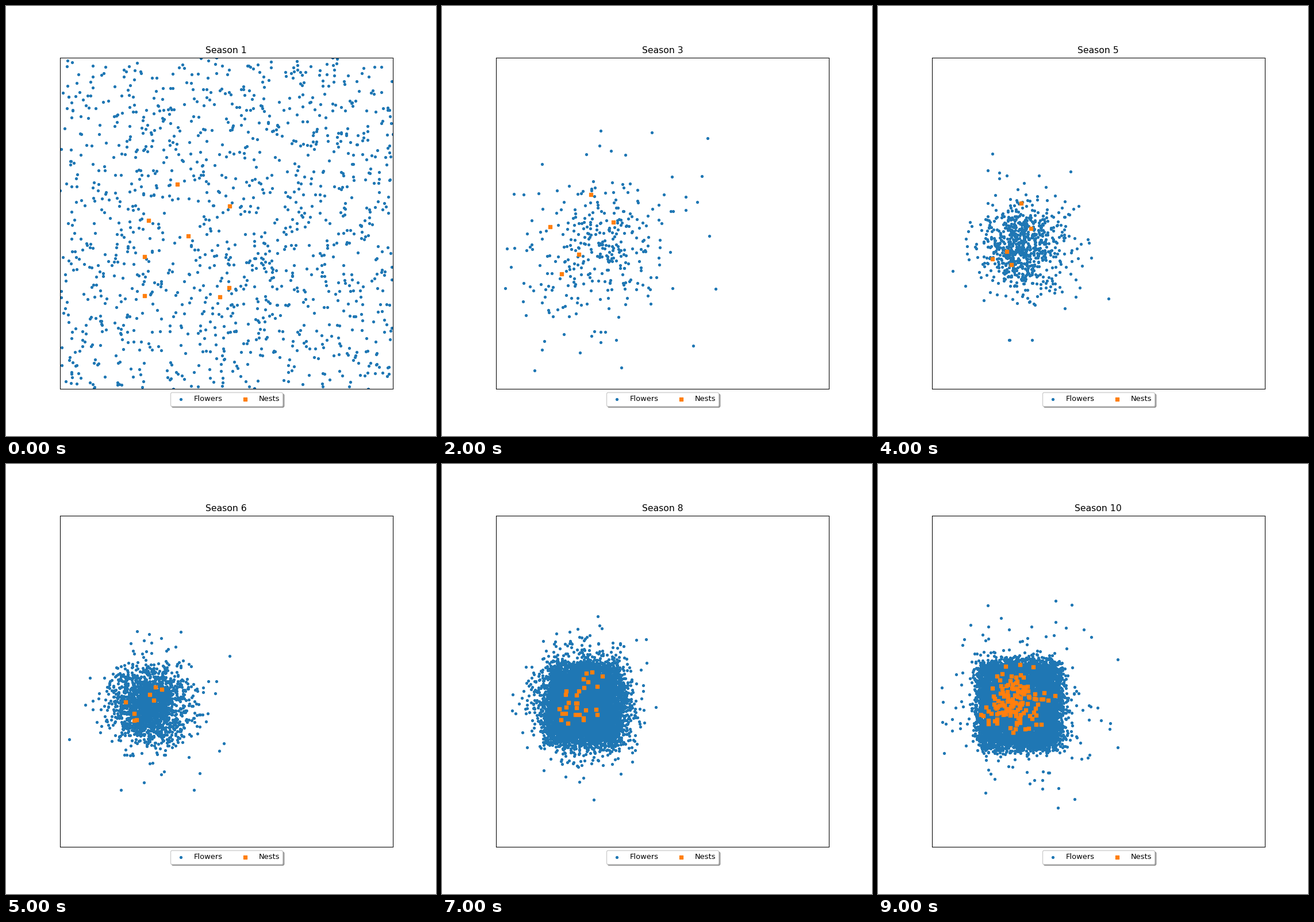
Animation of 748x748 px, one loop 10 s. Source, as a matplotlib script:

```python
import numpy as np
import matplotlib.pyplot as plt
from matplotlib.animation import FuncAnimation

SIZE, DPI, SEASONS = 748, 93.5, 10
LEFT, RIGHT, TOP, BOTTOM = 0.125 * SIZE, 0.9 * SIZE, 0.12 * SIZE, 0.89 * SIZE
HOME = np.array([246, 419])

# How the flower field develops at a few key seasons
KEYS = [2, 3, 5, 7, 9, 10]
COUNT = [630, 340, 760, 4500, 15000, 8000]
SPREAD = [60, 45, 34, 28, 41, 38]
STRAYS = [0.45, 0.5, 0.15, 0.02, 0.015, 0.03]
BOXINESS = [0, 0, 0, 0, 1, 1]

FOUNDERS = [(298, 310), (389, 348), (248, 373), (317, 400),
            (241, 436), (241, 504), (388, 490), (372, 506)]
NEST_COUNT = [8, 6, 5, 4, 5, 8, 12, 28, 61, 137]


def flowers(season):
    rng = np.random.default_rng(40 + season)
    if season == 1:
        return rng.uniform((LEFT, TOP), (RIGHT, BOTTOM), (1250, 2))
    n = int(np.exp(np.interp(season, KEYS, np.log(COUNT))))
    spread, strays, boxiness = (np.interp(season, KEYS, row)
                                for row in (SPREAD, STRAYS, BOXINESS))
    # The cloud turns from round to square as it fills up
    round_part = rng.normal(0, 1, (n, 2))
    box_part = rng.uniform(-1.75, 1.75, (n, 2)) + rng.normal(0, 0.25, (n, 2))
    pts = np.where(rng.random((n, 1)) < boxiness, box_part, round_part)
    far = rng.random(n) < strays
    pts[far] = 1.8 * np.clip(round_part[far], -2.5, 2.5)
    drift = (54 * 0.5 ** (season - 2), 0)
    pts = HOME + drift + spread * pts * (1, 1.06)
    return pts[((pts > (LEFT + 13, TOP + 5)) & (pts < (555, BOTTOM - 5))).all(axis=1)]


def nest_line():
    """Each new nest lies near an older one, a little closer to home."""
    rng = np.random.default_rng(7)
    line = [np.array(FOUNDERS)]
    for count in NEST_COUNT[1:]:
        old = line[-1]
        parents = old[rng.permutation(np.arange(count) % len(old))]
        line.append(parents + 0.25 * (HOME - parents) + rng.normal(0, 18, (count, 2)))
    return line


field = [flowers(s) for s in range(1, SEASONS + 1)]
nests = nest_line()

fig, ax = plt.subplots(figsize=(SIZE / DPI, SIZE / DPI), dpi=DPI)
ax.set(xlim=(LEFT, RIGHT), ylim=(BOTTOM, TOP), xticks=[], yticks=[])
flower_dots = ax.scatter([], [], s=36, marker=".", color="tab:blue", label="Flowers")
nest_dots = ax.scatter([], [], s=15, marker="s", color="tab:orange", label="Nests")
title = ax.set_title("Season 1")
ax.legend(loc="upper center", bbox_to_anchor=(0.5, 0), ncol=2,
          fancybox=True, shadow=True)


def draw(i):
    flower_dots.set_offsets(field[i])
    nest_dots.set_offsets(nests[i])
    title.set_text(f"Season {i + 1}")
    return flower_dots, nest_dots, title


anim = FuncAnimation(fig, draw, frames=SEASONS, interval=1000,
                     init_func=lambda: draw(0), repeat=True, repeat_delay=0)
plt.show()
```
